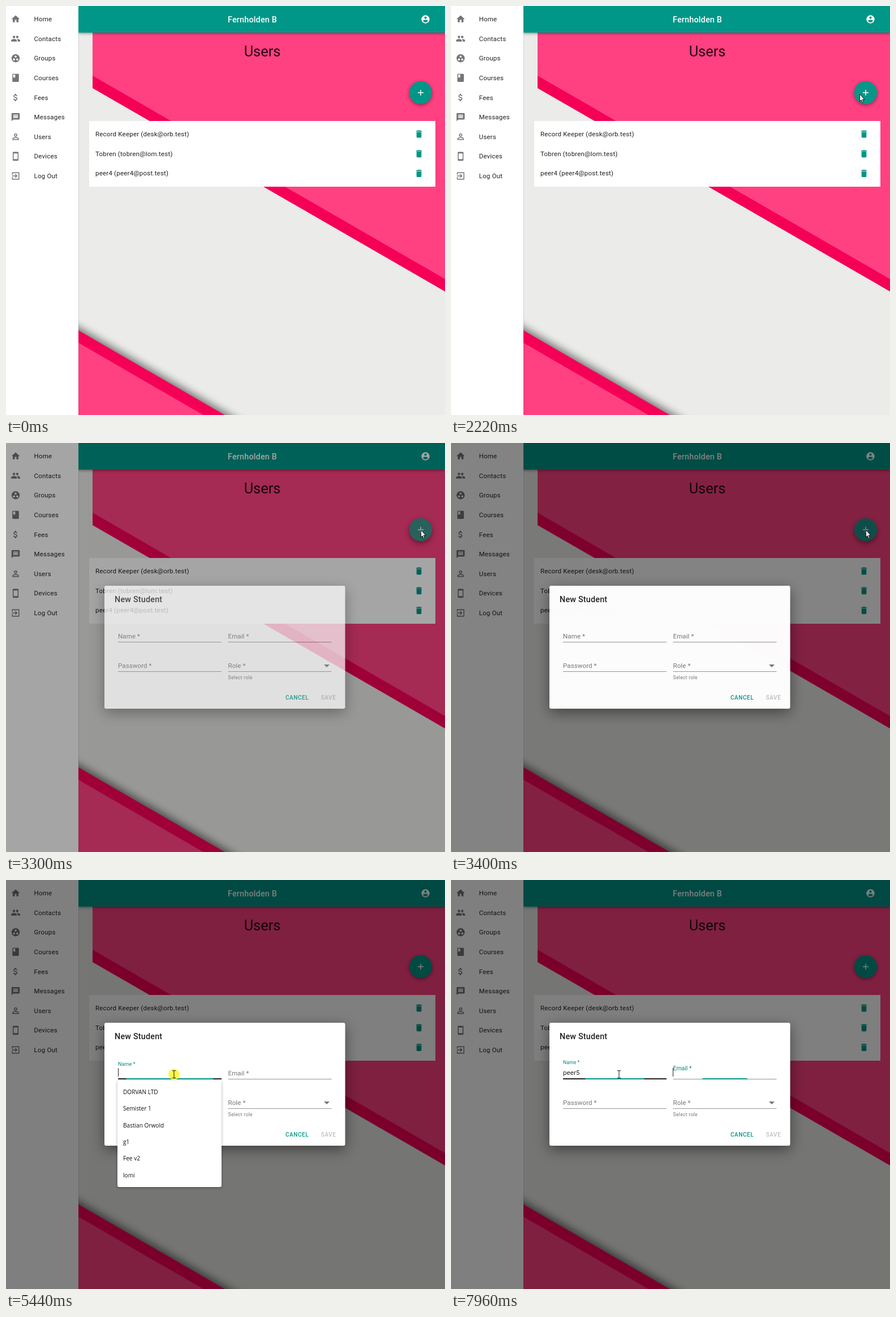
Write an HTML page that moves like this. It is 776 by 722 pixels and loops after 8000 ms.

```html
<!DOCTYPE html>
<html lang="en">
<head>
<meta charset="utf-8">
<title>User admin</title>
<style>
  html, body { margin: 0; width: 100%; height: 100%; overflow: hidden; background: #ebebe9; }
  svg { display: block; }
  text { font: 11.52px Roboto, sans-serif; letter-spacing: .2px; fill: rgba(0,0,0,.87); white-space: pre; }
  .title { font-size: 14.4px; font-weight: 500; letter-spacing: .18px; }
  .head { font-size: 25.4px; letter-spacing: 0; }
  .field { letter-spacing: .1px; }
  .hint { font-size: 8.64px; letter-spacing: .29px; }
  .button { font-size: 10.08px; font-weight: 500; letter-spacing: .5px; }
  .option { font: 10.1px "Open Sans", sans-serif; letter-spacing: 0; fill: #111; }
  .soft { fill: rgba(0,0,0,.54); }
  .off { fill: rgba(0,0,0,.26); }
  .teal { fill: #009688; }
  .white { fill: #fff; }
  .middle { text-anchor: middle; }
  .icon { fill: #757575; }
  .icon .line { fill: none; stroke: #757575; stroke-width: 2; }
  #bar { filter: drop-shadow(0 2px 2px rgba(0,0,0,.35)); }
  #corner { filter: drop-shadow(4px -4px 7px rgba(0,0,0,.48)); }
  #panel { filter: drop-shadow(0 7px 12px rgba(0,0,0,.45)); }
  #options { filter: drop-shadow(0 1px 2px rgba(0,0,0,.35)); }
</style>
</head>
<body>
<svg id="stage" width="776" height="722" viewBox="0 0 776 722"></svg>
<script>
const LOOP = 8000;
const SIZES = { title: 14.4, head: 25.4, hint: 8.64, button: 10.08, option: 10.1 };

// y is the middle of the capital letters
function label(x, y, str, cls = '', id = '') {
  const size = SIZES[cls.split(' ')[0]] || 11.52;
  return `<text x="${x}" y="${y + size * .355}" class="${cls}" id="${id}">${str}</text>`;
}
const rect = (x, y, w, h, fill, more = '') =>
  `<rect x="${x}" y="${y}" width="${w}" height="${h}" fill="${fill}" ${more}/>`;
const poly = (points, fill, more = '') => `<polygon points="${points}" fill="${fill}" ${more}/>`;
const disc = (x, y, r, cls = '') => `<circle cx="${x}" cy="${y}" r="${r}" class="${cls}"/>`;
const path = (d, cls = '') => `<path d="${d}" class="${cls}"/>`;
const icon = (x, y, shape, cls = 'icon') =>
  `<g class="${cls}" transform="translate(${x} ${y}) scale(.72) translate(-12 -12)">${shape}</g>`;

const menu = [
  ['Home', path('M10 20v-6h4v6h5v-8h3L12 3 2 12h3v8z')],
  ['Contacts', disc(8, 8, 3) + disc(16, 8, 3) +
    path('M8 13c-2.3 0-7 1.2-7 3.5V19h14v-2.5C15 14.2 10.3 13 8 13zm8 0l-1 .1c1.2.8 2 1.9 2 3.4V19h6v-2.5c0-2.3-4.7-3.5-7-3.5z')],
  ['Groups', disc(12, 12, 10) + disc(12, 8, 2.5, 'white') + disc(8, 15, 2.5, 'white') + disc(16, 15, 2.5, 'white')],
  ['Courses', rect(4, 2, 16, 20, '', 'rx="2" class="icon"') + path('M6 4h5v8l-2.5-1.5L6 12z', 'white')],
  ['Fees', path('M15.1 9C15 7.2 13.8 6 11.5 6S7.7 7.2 7.7 8.8c0 1.8 1.5 2.5 4 3.2s3.7 1.6 3.7 3.3S13.8 18 11.5 18 7.5 16.8 7.4 15', 'line') +
    path('M10 3h3v3h-3zM10 18h3v3h-3z')],
  ['Messages', path('M4 2h16a2 2 0 0 1 2 2v12a2 2 0 0 1-2 2H6l-4 4V4a2 2 0 0 1 2-2z') +
    path('M6 6h12v2H6zM6 9h12v2H6zM6 12h12v2H6z', 'white')],
  ['Users', `<circle cx="12" cy="8" r="3" class="line"/>` + path('M5 19v-2c0-1.7 4-3 7-3s7 1.3 7 3v2z', 'line')],
  ['Devices', rect(5, 1, 14, 22, '#757575', 'rx="2"') + path('M7 5h10v14H7z', 'white')],
  ['Log Out', path('M4 9V4h16v16H4v-5M3 12h12M10.8 7.7l4.3 4.3-4.3 4.3', 'line')]
];
const people = ['Record Keeper (desk@orb.test)', 'Tobren (tobren@lom.test)', 'peer4 (peer4@post.test)'];
const options = ['DORVAN LTD', 'Semister 1', 'Bastian Orwold', 'g1', 'Fee v2', 'lomi'];
const trash = path('M6 7h12v12a2 2 0 0 1-2 2H8a2 2 0 0 1-2-2zM19 4h-3.5l-1-1h-5l-1 1H5v2h14z');
const account = disc(12, 12, 10, 'white') + disc(12, 8, 3, 'teal') +
  path('M12 19.2c-2.5 0-4.7-1.3-6-3.2 0-2 4-3.1 6-3.1s6 1.1 6 3.1c-1.3 1.9-3.5 3.2-6 3.2z', 'teal');

const underline = (x, y) => rect(x, y, 183, 1, '#949494');

const page =
  rect(0, 0, 776, 722, '#ebebe9') +
  poly('153,47 776,47 776,504 153,145', '#f50057') +
  poly('153,47 776,47 776,482 153,123', '#ff4081') +
  poly('0,498.6 487,780 0,780', '#f50057', 'id="corner"') +
  poly('0,520.6 487,801.8 0,801.8', '#ff4081') +
  rect(128, 0, 648, 47, '#009688', 'id="bar"') +
  rect(0, 0, 128, 722, '#fff') + rect(128, 47, 1, 675, 'rgba(0,0,0,.1)') +
  label(435.5, 23.5, 'Fernholden B', 'title white middle') +
  icon(741.5, 23.5, account) +
  menu.map(([name, shape], i) =>
    icon(17, 23 + i * 34.62, shape) + label(49.5, 23 + i * 34.62, name)).join('') +
  label(453, 79.5, 'Users', 'head middle') +
  '<g id="fab">' + disc(733, 153, 20.2, 'teal') + '</g>' +
  '<circle id="glow" cx="733" cy="153" r="20.2" fill="#969696"/>' +
  icon(733, 153, path('M19 13h-6v6h-2v-6H5v-2h6V5h2v6h6z'), 'white') +
  rect(147, 203, 612, 116, '#fff') +
  people.map((who, i) =>
    label(158, 226 + i * 34.7, who) + icon(730, 226 + i * 34.7, trash, 'teal')).join('');

const dialog =
  rect(174, 252, 425.5, 217, '#fff', 'rx="3" id="panel"') +
  label(192, 276, 'New Student', 'title') +
  underline(198, 351) + underline(392.5, 351) + underline(198, 403) + underline(392.5, 403) +
  rect(198, 350, 183, 2, '#212121', 'id="hover"') +
  rect(198, 350, 183, 2, '#009688', 'id="nameLine"') +
  rect(392.5, 350, 183, 2, '#009688', 'id="emailLine"') +
  label(0, 0, 'Name *', 'field', 'nameLabel') +
  label(0, 0, 'Email *', 'field', 'emailLabel') +
  label(198, 393, 'Password *', 'field soft') +
  label(392.5, 393, 'Role *', 'field soft') +
  poly('562,391 572,391 567,396', 'rgba(0,0,0,.54)') +
  label(392.5, 414, 'Select role', 'hint soft') +
  label(494, 449.5, 'CANCEL', 'button teal') +
  label(556.7, 449.5, 'SAVE', 'button off') +
  label(198, 340, '', 'field', 'typed') +
  rect(0, 332, 1, 15, '#222', 'id="caret"') +
  '<g id="options">' + rect(197, 354, 184, 188, '#fff', 'rx="3"') +
  options.map((o, i) => label(207, 374.5 + i * 29.35, o, 'option')).join('') + '</g>';

const pointer =
  '<circle id="click" r="10" fill="#fff532" opacity=".85"/>' +
  '<path id="arrow" d="M.4.6V13.4L3.2 10.8 5.2 15.6 7.2 14.7 5.2 10H9z" fill="#fff" stroke="#000" stroke-width=".9"/>' +
  '<path id="beam" d="M-3 -6.5h2.2l.8.7.8-.7H3M-3 6.5h2.2l.8-.7.8.7H3M0-6V6" fill="none" stroke="#111"/>';

document.getElementById('stage').innerHTML = page +
  rect(0, 0, 776, 722, '#000', 'id="dim"') +
  `<g id="dialog">${dialog}</g><g id="pointer">${pointer}</g>`;

const el = {};
document.querySelectorAll('[id]').forEach(n => { if (n.id) el[n.id] = n; });
const set = (name, attr, value) => el[name].setAttribute(attr, value);
const show = (name, on) => { el[name].style.display = on ? '' : 'none'; };

// cubic-bezier(.25, .8, .25, 1)
function ease(x) {
  if (x <= 0) return 0;
  if (x >= 1) return 1;
  let lo = 0, hi = 1, s;
  for (let i = 0; i < 20; i++) {
    s = (lo + hi) / 2;
    if (.75 * s * (1 - s) + s ** 3 < x) lo = s; else hi = s;
  }
  return 2.4 * s * (1 - s) ** 2 + 3 * s * s * (1 - s) + s ** 3;
}

// linear track of [time, value] pairs
function track(t, keys) {
  if (t <= keys[0][0]) return keys[0][1];
  for (let i = 1; i < keys.length; i++) {
    const [a, va] = keys[i - 1], [b, vb] = keys[i];
    if (t <= b) return va + (vb - va) * (t - a) / (b - a);
  }
  return keys[keys.length - 1][1];
}

// pointer legs: first change, last change, steps, end x, end y
const legs = [
  [530, 530, 1, 467, -5], [580, 580, 1, 447, -4],
  [760, 1450, 10, 629, 104], [1670, 2310, 9, 735, 162], [2470, 2560, 2, 733, 153],
  [3560, 3870, 5, 412, 282], [3960, 3960, 1, 394, 282],
  [4110, 4420, 6, 326, 315], [4610, 4970, 6, 297, 343]
];
function pointerAt(t) {
  let x = 467, y = -30;
  for (const [from, to, steps, ex, ey] of legs) {
    if (t < from) break;
    const k = t >= to ? steps : Math.floor((t - from) / (to - from) * (steps - 1)) + 1;
    const u = 1 - (1 - k / steps) ** 1.4;
    x += (ex - x) * u;
    y += (ey - y) * u;
  }
  return [x, y];
}

const dimKeys = [[3220, 0], [3230, .012], [3300, .35], [3400, .485], [3500, .5]];
const fadeKeys = [[3230, 0], [3300, .7], [3400, .98], [3460, 1]];
const glowKeys = [[3090, .06], [3160, .3], [3230, .42], [3300, .42], [3400, .22], [3560, .06]];
const liftKeys = [[3080, 0], [3230, 1], [3400, 1], [3600, 0]];
const caretOn = [[5320, 5910], [6300, 6930], [7340, 7870], [7960, 8000]];
const typing = [[7340, 'peer5'], [6360, 'peer'], [6300, 'pe']];
const within = (t, spans) => spans.some(([a, b]) => t >= a && t < b);

function field(name, x, float, line, active) {
  set(name + 'Label', 'transform', `translate(${x} ${341 - 19 * float}) scale(${1 - .25 * float})`);
  el[name + 'Label'].style.fill = active ? '#00897b' : 'rgba(0,0,0,.54)';
  set(name + 'Line', 'x', x + 91.5 * (1 - line));
  set(name + 'Line', 'width', 183 * line);
}

function render(t) {
  const [x, y] = pointerAt(t);
  const overField = x < 381 && y > 331;
  const overFab = Math.hypot(x - 733, y - 153) < 20;
  set('pointer', 'transform', `translate(${x} ${y})`);
  show('pointer', t >= 530);
  show('arrow', !overField);
  show('beam', overField);
  show('click', within(t, [[2930, 3160], [5320, 5530]]));

  const lift = track(t, liftKeys);
  el.fab.style.filter = `drop-shadow(0 ${2.5 + 2 * lift}px ${3 + 2 * lift}px rgba(0,0,0,.4))`;
  set('glow', 'opacity', overFab ? track(t, glowKeys) : 0);

  set('dim', 'opacity', track(t, dimKeys));
  set('dialog', 'opacity', track(t, fadeKeys));
  show('dialog', t >= 3230);

  const focus = t < 5320 ? 0 : ease((t - 5300) / 400);
  const next = t < 7960 ? 0 : ease((t - 7907) / 400);
  field('name', 198, focus, focus * (1 - next), t >= 5320);
  field('email', 392.5, next, next, t >= 7960);
  show('hover', overField);
  show('options', t >= 5400 && t < 6300);

  const entry = typing.find(([from]) => t >= from);
  el.typed.textContent = entry ? entry[1] : '';
  const end = entry ? el.typed.getComputedTextLength() : 0;
  set('caret', 'x', t >= 7960 ? 392 : Math.floor(198 + end));
  show('caret', within(t, caretOn));
}

const start = performance.now();
function tick() {
  render((performance.now() - start) % LOOP);
  requestAnimationFrame(tick);
}
tick();
</script>
</body>
</html>
```
